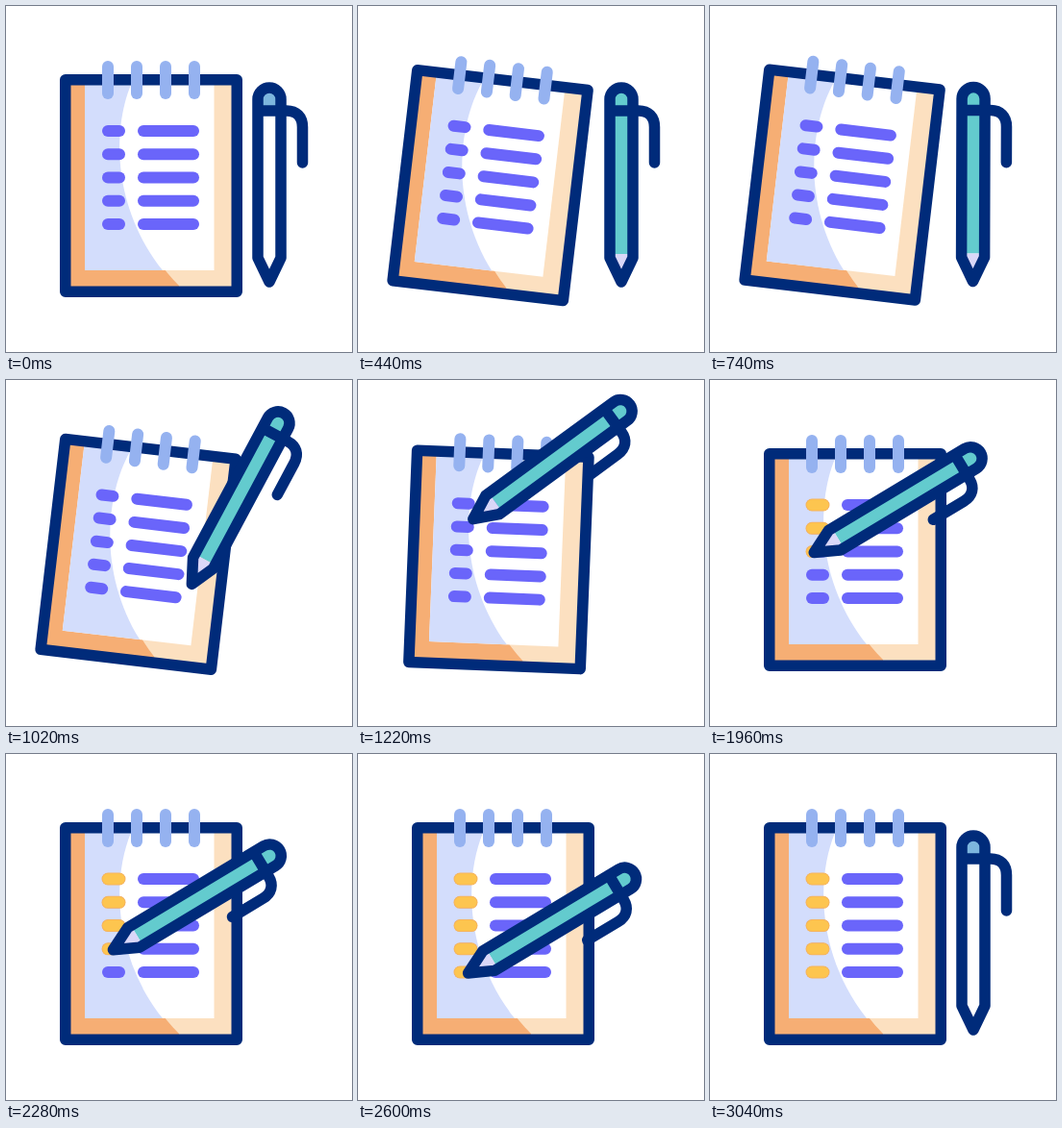
Write an HTML page that moves like this. It is 360 px wide and 360 px high and loops after 3060 ms.

```html
<!DOCTYPE html>
<html lang="en">
<head>
<meta charset="utf-8">
<title>Notepad checklist</title>
<style>
  html, body { margin: 0; width: 100%; height: 100%; overflow: hidden; background: #fff; }
  svg { display: block; width: 100vw; height: 100vh; }
  .ink { stroke: #002b7a; stroke-width: 11.5; stroke-linecap: round; stroke-linejoin: round; fill: none; }
  .bar { stroke-width: 12; stroke-linecap: round; }
</style>
</head>
<body>
<svg viewBox="0 0 360 360">
  <g id="pad">
    <rect x="62" y="77" width="178" height="220" fill="#fce0c0"/>
    <path d="M62 77H130V82C108 130 112 220 180 291V297H62Z" fill="#f6ae74"/>
    <rect x="82" y="77" width="134.5" height="198" fill="#fff"/>
    <path d="M82 77H131L130 82C110 130 112 211 163 275H82Z" fill="#d3ddfc"/>
    <rect class="ink" x="61.75" y="76.75" width="178.5" height="220.5"/>
    <g id="rings" stroke="#95b2f0"></g>
    <g id="rows"></g>
  </g>
  <g id="pen">
    <path id="barrel" d="M-12-178H12V-30H-12Z" />
    <path id="nib" d="M-12-30H12V-26L0 0L-12-26Z"/>
    <path id="cap" d="M-12-178V-191A12 12 0 0 1 12-191V-178Z"/>
    <path class="ink" d="M-12-26V-191A12 12 0 0 1 12-191V-26L0-1ZM-12-179H18C28-179 34.5-173 34.5-162V-125"/>
  </g>
</svg>
<script>
const LOOP = 3060;
const ROW_YS = [130, 154.3, 178.6, 202.8, 227];
const ROW_STARTS = [1340, 1620, 1940, 2240, 2540];
const WRITE_MS = 100;
const [LEFT, RIGHT] = [104, 120];
const REST = { x: 274, y: 288, angle: 0 };
const WRITE_ANGLE = 59;
const BOB = [[80, 0], [330, 7], [560, -7], [800, 1], [1040, -5], [1200, 0]];

const $ = id => document.getElementById(id);
const progress = (t, from, to) => Math.min(1, Math.max(0, (t - from) / (to - from)));
const mix = (a, b, u) => a + (b - a) * u;
const smooth = u => (1 - Math.cos(Math.PI * u)) / 2;
const easeOut = u => 1 - (1 - u) ** 3;

function addLine(parent, x1, y1, x2, y2, stroke) {
  const line = document.createElementNS('http://www.w3.org/2000/svg', 'line');
  const attrs = { x1, y1, x2, y2, class: 'bar' };
  if (stroke) attrs.stroke = stroke;
  for (const name in attrs) line.setAttribute(name, attrs[name]);
  parent.append(line);
  return line;
}

for (let i = 0; i < 4; i++) addLine($('rings'), 106 + 30 * i, 63, 106 + 30 * i, 91);
const marks = ROW_YS.map(y => {
  addLine($('rows'), 106, y, 118, y, '#6a65fa');
  addLine($('rows'), 143, y, 195, y, '#6a65fa');
  const edge = addLine($('rows'), 106, y, 106, y, '#f7b45c');
  const core = addLine($('rows'), 106, y, 106, y, '#fdc54f');
  edge.style.strokeWidth = 13;
  core.style.strokeWidth = 11;
  return [edge, core];
});

function track(keys, t) {
  let value = keys[0][1];
  for (let i = 1; i < keys.length; i++) {
    const [t0] = keys[i - 1], [t1, v1] = keys[i];
    value = mix(value, v1, smooth(progress(t, t0, t1)));
  }
  return value;
}

function blendPose(a, b, u) {
  return { x: mix(a.x, b.x, u), y: mix(a.y, b.y, u), angle: mix(a.angle, b.angle, u) };
}

function penPose(t) {
  const at = (x, row) => ({ x, y: ROW_YS[row] + 1.5, angle: WRITE_ANGLE });
  const last = ROW_YS.length - 1;
  const doneAt = ROW_STARTS[last] + WRITE_MS;
  if (t < ROW_STARTS[0]) return blendPose(REST, at(LEFT, 0), smooth(progress(t, 720, ROW_STARTS[0])));
  if (t > doneAt) return blendPose(at(RIGHT, last), REST, smooth(progress(t, 2650, 3000)));
  const row = ROW_STARTS.findLastIndex(start => t >= start);
  const end = ROW_STARTS[row] + WRITE_MS;
  if (t <= end) return at(mix(LEFT, RIGHT, progress(t, ROW_STARTS[row], end)), row);
  return blendPose(at(RIGHT, row), at(LEFT, row + 1), easeOut(progress(t, end, ROW_STARTS[row + 1])));
}

function render(t) {
  const tilt = 6.7 * (smooth(progress(t, 80, 330)) - smooth(progress(t, 1040, 1340)));
  $('pad').setAttribute('transform', `translate(0 ${track(BOB, t)}) rotate(${tilt} 151 72)`);

  marks.forEach((lines, i) => {
    const start = ROW_STARTS[i];
    const x2 = mix(106, 118, progress(t, start, start + WRITE_MS));
    for (const line of lines) {
      line.setAttribute('x2', x2);
      line.style.display = t < start ? 'none' : '';
    }
  });

  const { x, y, angle } = penPose(t);
  $('pen').setAttribute('transform', `translate(${x} ${y}) rotate(${angle})`);

  // The parked pen is an empty outline; it is coloured while in use.
  const parked = t < 80 || t >= 3000;
  $('barrel').setAttribute('fill', parked ? '#fff' : '#63cbce');
  $('nib').setAttribute('fill', parked ? '#fff' : '#dad7f8');
  $('cap').setAttribute('fill', parked ? '#7db6de' : '#63cbce');
}

const origin = performance.now();
function tick() {
  render((performance.now() - origin) % LOOP);
  requestAnimationFrame(tick);
}
tick();
</script>
</body>
</html>
```
